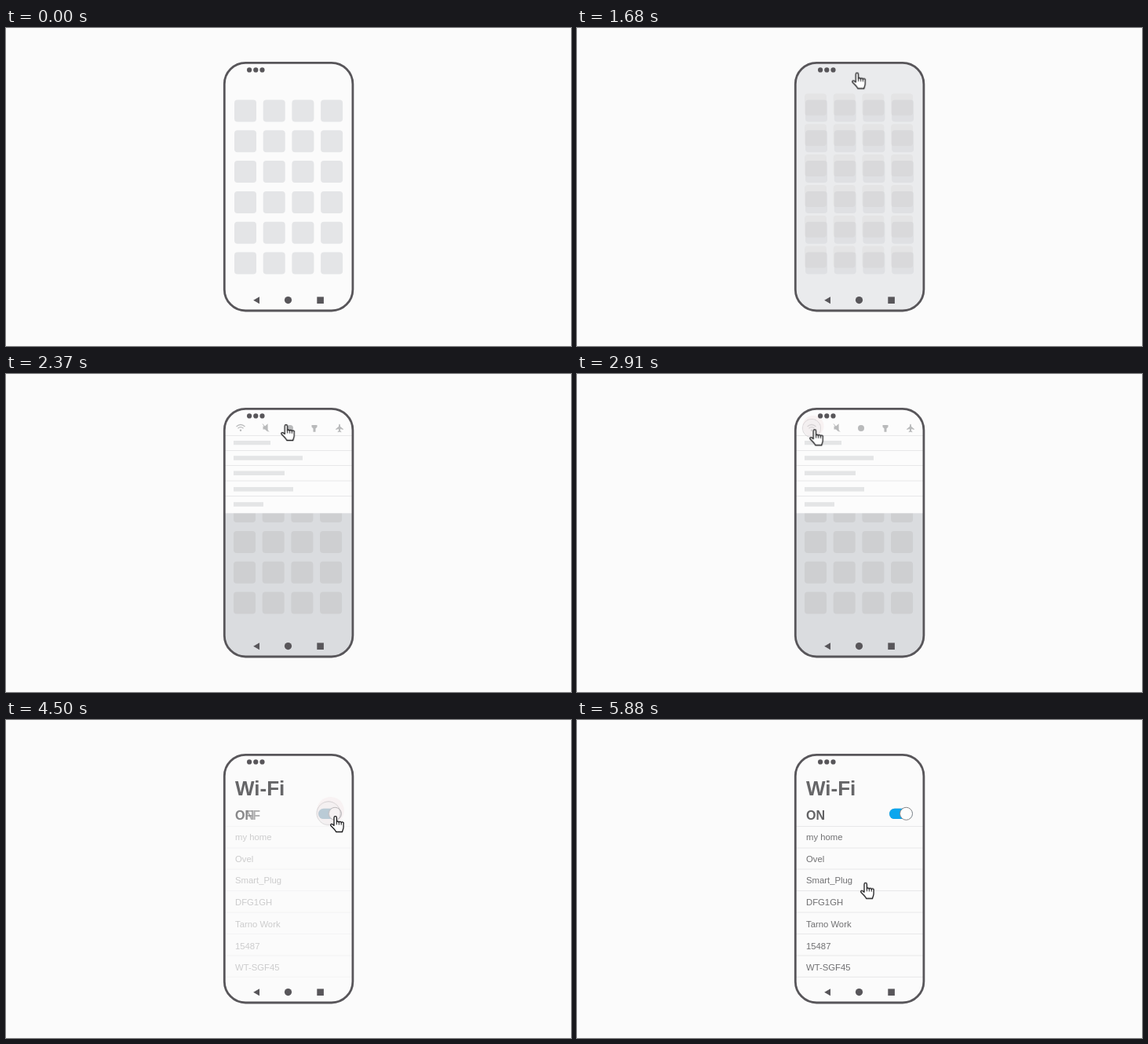
An HTML page for the animation above (7170 ms loop, 720 by 405 pixels).

```html
<!DOCTYPE html>
<html lang="en">
<head>
<meta charset="utf-8">
<title>Turning on Wi-Fi</title>
<style>
  html, body { margin: 0; width: 100%; height: 100%; overflow: hidden; background: #fbfbfb; }
  svg { display: block; width: 100%; height: 100%; font-family: "Liberation Sans", Arial, sans-serif; }

  .anim { animation: 7.17s linear infinite both; }
  .tiles { color: #e4e5e7; }
  .dim .tiles { color: #cecfd1; }
  .bars { stroke: #e4e5e6; stroke-width: 5.4; }
  .rules { stroke: #e8e8e9; stroke-width: 1; }
  .icons { fill: #b9babb; }
  .status, .nav { fill: #58565a; }
  .title { font: bold 26px "Liberation Sans", Arial, sans-serif; fill: #666668; }
  .state { font: bold 16px "Liberation Sans", Arial, sans-serif; fill: #626264; }
  .names { font-size: 11.3px; fill: #707072; }
  .knob { fill: #fdfdfd; stroke: #858587; stroke-width: 1; }

  /* screens */
  .dim { animation-name: dim; }
  .panel { animation-name: panel; }
  .page { animation-name: page; }
  @keyframes dim { 0%, 19.53% { opacity: 0 } 27.2%, 100% { opacity: 1 } }
  @keyframes panel {
    0%, 25.8% { transform: translateY(-135px); animation-timing-function: ease-in-out }
    30.68%, 43.1% { transform: none; animation-timing-function: ease-in-out }
    46.03%, 100% { transform: translateY(-135px) }
  }
  @keyframes page { 0%, 43.1% { opacity: 0 } 49.37%, 100% { opacity: 1 } }

  /* switch */
  .knob { animation-name: knob; }
  .track-on { animation-name: track; }
  .list { animation-name: list; }
  .on { animation-name: on; }
  .off { animation-name: off; }
  @keyframes knob {
    0%, 59.41% { transform: translateX(0); animation-timing-function: ease-in-out }
    63.18%, 100% { transform: translateX(13px) }
  }
  @keyframes track { 0%, 61.5% { opacity: 0 } 66.53%, 100% { opacity: 1 } }
  @keyframes list { 0%, 61.09% { opacity: 0 } 66.11%, 100% { opacity: 1 } }
  @keyframes on { 0%, 60.67% { opacity: 0 } 64.85%, 100% { opacity: 1 } }
  @keyframes off { 0%, 60.67% { opacity: 1 } 64.85%, 100% { opacity: 0 } }

  /* pointer */
  .hand { animation-name: move, appear; animation-duration: 7.17s, 7.17s; }
  @keyframes appear { 0%, 6% { opacity: 0 } 10.46%, 100% { opacity: 1 } }
  @keyframes move {
    0%, 10.74% { transform: translate(350.2px, 64px); animation-timing-function: ease-in-out }
    17.02% { transform: translate(350.2px, 29.5px); animation-timing-function: ease-in-out }
    26.5%, 33.05% { transform: translate(350.2px, 64px); animation-timing-function: ease-in-out }
    38.08%, 50.63% { transform: translate(296.2px, 70.2px); animation-timing-function: ease-in-out }
    54.81%, 71.13% { transform: translate(413px, 122px); animation-timing-function: ease-in-out }
    76.15%, 100% { transform: translate(361px, 206.8px) }
  }

  .ripple { opacity: 0; animation: ripple 7.17s linear var(--at) infinite; }
  .ripple circle { vector-effect: non-scaling-stroke; }
  @keyframes ripple {
    0% { opacity: 1; transform: scale(0); animation-timing-function: ease-out }
    5.44% { opacity: .6; transform: scale(1) }
    5.45%, 100% { opacity: 0; transform: scale(1) }
  }
</style>
</head>
<body>
<svg viewBox="0 0 720 405">
  <defs>
    <clipPath id="screen"><rect x="279" y="45" width="162.3" height="314.5" rx="26"/></clipPath>
    <rect id="tile" width="28" height="28" rx="4" fill="currentColor"/>
    <g id="row">
      <use href="#tile"/><use href="#tile" x="36.7"/><use href="#tile" x="73.4"/><use href="#tile" x="110.1"/>
    </g>
    <g id="grid">
      <use href="#row"/><use href="#row" y="38.8"/><use href="#row" y="77.6"/>
      <use href="#row" y="116.4"/><use href="#row" y="155.2"/><use href="#row" y="194"/>
    </g>
    <g id="wave">
      <circle cx="3" cy="-4" r="20" fill="#f3e4e7" fill-opacity=".6"/>
      <circle r="17.2" fill="#e6e4e6" fill-opacity=".45" stroke="#b9b3b6"/>
    </g>
  </defs>

  <rect width="720" height="405" fill="#fbfbfb"/>

  <g clip-path="url(#screen)">
    <use class="tiles" href="#grid" x="291" y="91.5"/>

    <g class="dim anim">
      <rect x="278" y="44" width="165" height="317" fill="#dadcdf"/>
      <use class="tiles" href="#grid" x="290" y="83.5"/>
    </g>

    <g class="panel anim">
      <rect x="278" y="40" width="165" height="137.3" fill="#fcfcfc"/>
      <path class="bars" d="M290 87.6h47M290 107h88M290 126.3h65M290 146.7h76M290 166h38"/>
      <path class="rules" d="M279 78.5h163M279 97.5h163M279 116.5h163M279 136h163M279 155.5h163"/>
      <g class="icons">
        <g fill="none" stroke="#b9babb" stroke-width="1.2">
          <path d="M293.5 67q5.5-5 11 0M295.5 69.2q3.5-3 7 0"/>
        </g>
        <circle cx="299" cy="71.8" r="1.2"/>
        <path d="M327.5 66.5h2.5l3.6-3.2v10.4l-3.6-3.2h-2.5z"/>
        <path d="M327 63.5l8 10" fill="none" stroke="#b9babb"/>
        <circle cx="362" cy="69" r="4"/>
        <path d="M389.5 65h7v2.4l-2 2v4.4h-3v-4.4l-2-2z"/>
        <path d="M425 63.5q1.1.2 1.1 3.4l3.7 3v1.2l-3.7-1.2v2.6l1.2 1v.8l-2.3-.6-2.3.6v-.8l1.2-1v-2.6l-3.7 1.2v-1.2l3.7-3q0-3.2 1.1-3.4z"/>
      </g>
    </g>

    <g class="page anim">
      <rect x="278" y="44" width="165" height="317" fill="#fbfbfb"/>
      <text class="title" x="292" y="96">Wi-Fi</text>
      <text class="state off anim" x="292" y="126.5">OFF</text>
      <text class="state on anim" x="292" y="126.5">ON</text>
      <rect x="398" y="112.7" width="29.5" height="13.4" rx="6.7" fill="#b2b3b6"/>
      <rect class="track-on anim" x="398" y="112.7" width="29.5" height="13.4" rx="6.7" fill="#0ba6ee"/>
      <circle class="knob anim" cx="406.5" cy="119.3" r="8"/>
      <g class="list anim">
        <path class="rules" d="M279 135.5h163M279 163h163M279 190h163M279 217.5h163M279 245h163M279 272.5h163M279 300h163M279 327.3h163"/>
        <g class="names">
          <text x="292" y="152.5">my home</text>
          <text x="292" y="180.7">Ovel</text>
          <text x="292" y="208.2">Smart_Plug</text>
          <text x="292" y="236">DFG1GH</text>
          <text x="292" y="263.8">Tarno Work</text>
          <text x="292" y="291.6">15487</text>
          <text x="292" y="319.4">WT-SGF45</text>
        </g>
      </g>
    </g>

    <g transform="translate(299 69)"><use class="ripple" style="--at: 2.72s" href="#wave"/></g>
    <g transform="translate(411 118.7)"><use class="ripple" style="--at: 4.23s" href="#wave"/></g>
    <g transform="translate(363.5 205.5)"><use class="ripple" style="--at: 5.48s" href="#wave"/></g>
  </g>

  <rect x="278.3" y="44.4" width="163.6" height="315.6" rx="27" fill="none" stroke="#58565a" stroke-width="2.8"/>
  <g class="status">
    <circle cx="310.1" cy="53.4" r="3.1"/><circle cx="318.3" cy="53.4" r="3.1"/><circle cx="326.5" cy="53.4" r="3.1"/>
  </g>
  <g class="nav">
    <path d="M315.2 346.8l7.8-4.5v9z"/>
    <circle cx="359.5" cy="346.6" r="4.6"/>
    <rect x="396.3" y="342.4" width="8.6" height="8.6"/>
  </g>

  <g class="hand anim" fill="#fff" stroke="#1c1c1e" stroke-width="1.3" stroke-linecap="round" stroke-linejoin="round">
    <path d="M5 12.4V2.4a1.7 1.7 0 0 1 3.4 0V8a1.5 1.5 0 0 1 2.9.4 1.5 1.5 0 0 1 2.9.6 1.5 1.5 0 0 1 2.9 1v4.2c0 2.6-1 3.4-1.6 6.3H7.6C7 18.200 4.200 16 1.100 12.800c-1.200-1.500.4-3 1.800-2z"/>
    <path d="M8.400 8v3M11.300 8.400v2.800M14.200 9v2.400" fill="none" stroke-width="1"/>
  </g>
</svg>
</body>
</html>
```
